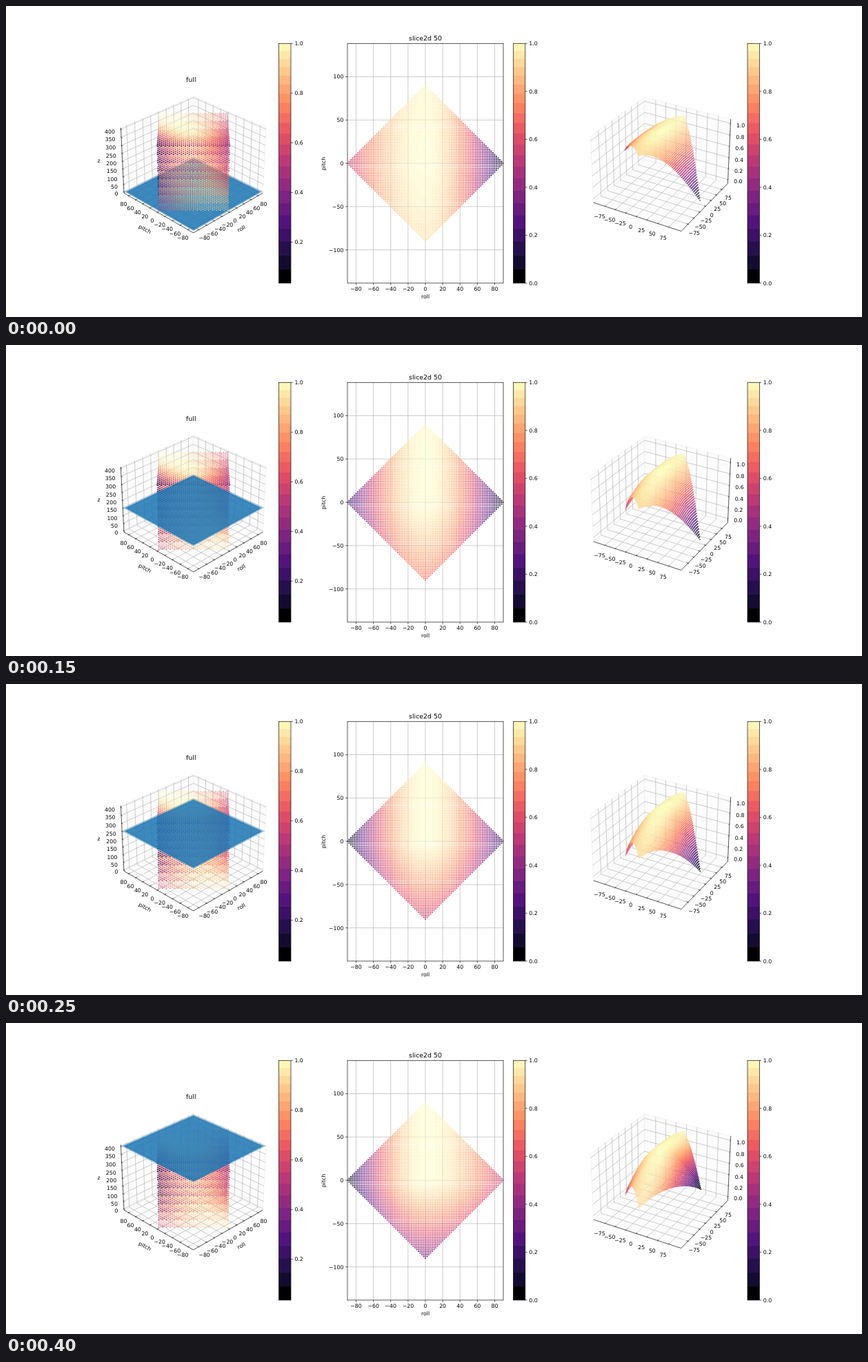
An HTML page with a canvas that plays this animation: 1241x451 px, repeating every 450 ms.

```html
<!DOCTYPE html>
<html lang="en">
<head>
<meta charset="utf-8">
<title>Slices</title>
<style>
html, body { margin: 0; width: 100%; height: 100%; overflow: hidden; background: #fff; }
canvas { display: block; }
</style>
</head>
<body>
<canvas id="stage" width="1241" height="451"></canvas>
<script>
const W = 1241, H = 451, STEP = 50, LAYERS = 9;
const FONT = '"DejaVu Sans", Verdana, sans-serif';
const DOT = 0.98, THIN = 0.65;
const RAD = Math.PI / 180;
const stage = document.getElementById('stage').getContext('2d');

// Colour map
const stops = [[0, 0, 4], [28, 16, 68], [81, 18, 124], [130, 38, 129], [183, 55, 121],
  [231, 82, 99], [252, 137, 97], [254, 196, 136], [252, 253, 191]];
function mapColor(v) {
  const f = Math.min(1, Math.max(0, v)) * 8, i = Math.min(7, Math.floor(f));
  const c = stops[i].map((a, k) => Math.round(a + (stops[i + 1][k] - a) * (f - i)));
  return `rgb(${c})`;
}
const palette = Array.from({ length: 65 }, (_, i) => mapColor(i / 64));
const shade = v => palette[Math.round(v * 64)];

// Value of the field at a roll, a pitch and a height
function field(r, p, z) {
  const left = Math.min(90, 60 + 0.15 * z) / 90;
  const right = Math.min(90, 60 + 0.15 * (400 - z)) / 90;
  const tip = p < 0 ? 22 + 0.19 * z - 0.00017 * z * z : 12 * (1 - z / 400);
  const drop = (1 - Math.cos(tip * RAD)) * (Math.abs(p) / 90) ** 1.3;
  const v = Math.cos(r * (r < 0 ? left : right) * RAD) - drop;
  return Math.min(1, Math.max(0, v));
}

function diamond(step) {
  const pts = [];
  for (let r = -90; r <= 90; r += step)
    for (let p = -90; p <= 90; p += step)
      if (Math.abs(r) + Math.abs(p) <= 90) pts.push([r, p]);
  return pts;
}
const fine = diamond(2), coarse = diamond(5);

// Perspective camera; box coordinates run from -1 to 1
function camera(cx, cy, azim) {
  const ca = Math.cos(azim * RAD), sa = Math.sin(azim * RAD);
  const ce = Math.cos(30 * RAD), se = 0.5, scale = 1223;
  return (x, y, z) => {
    x *= 0.5714; y *= 0.5714; z *= 0.4286;
    const u = x * ca + y * sa, w = u * ce + z * se, d = 10 - w;
    return [cx + scale * (y * ca - x * sa) / d, cy - scale * (z * ce - u * se) / d, w];
  };
}
const fullView = camera(271.7, 225, 225);
const sliceView = camera(950.9, 224.7, -60);
const fullPoint = (r, p, z) => fullView(r / 90, p / 90, z / 200 - 1);
const slicePoint = (r, p, v) => sliceView(r / 99, p / 99, (v + 0.05) / 0.55 - 1);

function layer() {
  const c = document.createElement('canvas');
  c.width = W;
  c.height = H;
  return c.getContext('2d');
}

function line(g, pts, color, width = THIN) {
  g.beginPath();
  pts.forEach(p => g.lineTo(p[0], p[1]));
  g.strokeStyle = color;
  g.lineWidth = width;
  g.stroke();
}

function fill(g, pts, color) {
  g.beginPath();
  pts.forEach(p => g.lineTo(p[0], p[1]));
  g.closePath();
  g.fillStyle = color;
  g.fill();
}

// Centres the capital height on y
function text(g, s, x, y, align = 'center', size = 7.8, turn = 0) {
  g.save();
  g.translate(x, y);
  g.rotate(turn * RAD);
  g.font = `${size}px ${FONT}`;
  g.textAlign = align;
  g.fillStyle = '#000';
  g.fillText(String(s).replace('-', '\u2212'), 0, 0.365 * size);
  g.restore();
}

function dot(g, x, y, color) {
  g.fillStyle = color;
  g.beginPath();
  g.arc(x, y, DOT, 0, 7);
  g.fill();
}

// Far dots first, fading with distance
function scatter(g, pts) {
  pts.sort((a, b) => a.at[2] - b.at[2]);
  const far = pts[0].at[2], near = pts[pts.length - 1].at[2];
  for (const { at, v } of pts) {
    g.globalAlpha = 0.3 + 0.7 * (at[2] - far) / (near - far);
    dot(g, at[0], at[1], shade(v));
  }
  g.globalAlpha = 1;
}

const range = (from, to, by) =>
  Array.from({ length: Math.round((to - from) / by) + 1 }, (_, i) => from + i * by);

// Walls, grid and labelled ticks of a 3D box
function box(g, o) {
  const E = 25 / 24, v = o.view, bx = o.backX;
  const quads = [
    [[-E, -E, -E], [E, -E, -E], [E, E, -E], [-E, E, -E]],
    [[bx * E, -E, -E], [bx * E, E, -E], [bx * E, E, E], [bx * E, -E, E]],
    [[-E, E, -E], [E, E, -E], [E, E, E], [-E, E, E]]
  ];
  for (const q of quads) {
    const pts = q.map(c => v(...c));
    fill(g, pts, '#fcfcfc');
    line(g, [...pts, pts[0]], '#ededed');
  }
  const grid = (...pts) => line(g, pts.map(c => v(...c)), '#b0b0b0');
  const tick = (a, b) => line(g, [v(...a), v(...b)], '#000');
  const inn = E - 0.034, out = E + 0.017;
  const label = (s, c, off, align) => {
    const p = v(...c);
    text(g, s, p[0] + off[0], p[1] + off[1], align);
  };
  for (const t of o.ticks) {
    const n = t / o.half;
    grid([n, -E, -E], [n, E, -E], [n, E, E]);
    grid([-bx * E, n, -E], [bx * E, n, -E], [bx * E, n, E]);
  }
  for (const t of o.zTicks) {
    const n = o.zNorm(t);
    grid([bx * E, -E, n], [bx * E, E, n], [-bx * E, E, n]);
  }
  for (const t of o.ticks) {
    const n = t / o.half;
    tick([n, -inn, -E], [n, -out, -E]);
    tick([-bx * inn, n, -E], [-bx * out, n, -E]);
    label(t, [n, -E, -E], o.xOff);
    label(t, [-bx * E, n, -E], o.yOff);
  }
  for (const t of o.zTicks) {
    const n = o.zNorm(t);
    tick([-bx * E, inn, n], [-bx * E, out, n]);
    label(o.zText(t), [-bx * E, E, n], o.zOff, o.zAlign);
  }
  line(g, [v(-E, -E, -E), v(E, -E, -E)], '#000');
  line(g, [v(-bx * E, -E, -E), v(-bx * E, E, -E)], '#000');
  line(g, [v(-bx * E, E, -E), v(-bx * E, E, E)], '#000');
}

// Bands grow towards the dark end
function colorBar(g, x, low) {
  const top = 54.3, h = 347.6, n = 22;
  let y = top;
  for (let i = 0; i < n; i++) {
    const b = 11 + i * (h - 11 * n) / (n * (n - 1) / 2);
    g.fillStyle = mapColor(i === n - 1 ? 0 : 1 - (y + b / 2 - top) / h);
    g.fillRect(x, y, 17.4, b + (i < n - 1 ? 0.5 : 0));
    y += b;
  }
  g.strokeStyle = '#000';
  g.lineWidth = THIN;
  g.strokeRect(x, top, 17.4, h);
  for (const t of range(0, 1, 0.2)) {
    if (t < low) continue;
    const ty = top + h * (1 - t) / (1 - low);
    line(g, [[x + 17.4, ty], [x + 20.2, ty]], '#000');
    text(g, t.toFixed(1), x + 22.8, ty, 'left');
  }
}

const mapX = r => 608 + r * 1.2556;
const mapY = p => 228.1 - p * 1.2556;

function flatGrid(g) {
  for (const r of range(-80, 80, 20)) {
    const x = mapX(r);
    line(g, [[x, 54.3], [x, 401.9]], '#b0b0b0');
    line(g, [[x, 401.9], [x, 404.6]], '#000');
    text(g, r, x, 410.5);
  }
  for (const p of range(-100, 100, 50)) {
    const y = mapY(p);
    line(g, [[495, y], [721, y]], '#b0b0b0');
    line(g, [[492.3, y], [495, y]], '#000');
    text(g, p, 489.5, y, 'right');
  }
  text(g, 'slice2d 50', 608, 46.5, 'center', 9.4);
  text(g, 'roll', 608, 421.3);
  text(g, 'pitch', 460.5, 228.5, 'center', 7.8, -90);
}

function buildBase() {
  const g = layer();
  g.fillStyle = '#fff';
  g.fillRect(0, 0, W, H);
  box(g, {
    view: fullView, backX: 1, half: 90, ticks: range(-80, 80, 20),
    zTicks: range(0, 400, 50), zNorm: t => t / 200 - 1, zText: t => t,
    xOff: [8, 12], yOff: [-7.5, 12], zOff: [-8.5, 3.2], zAlign: 'right'
  });
  text(g, 'full', 268.3, 106.5, 'center', 9.4);
  text(g, 'z', 134.5, 224.3);
  text(g, 'pitch', 201.5, 323.5, 'center', 7.8, 28);
  text(g, 'roll', 341, 322.7, 'center', 7.8, -28);
  box(g, {
    view: sliceView, backX: -1, half: 99, ticks: range(-75, 75, 25),
    zTicks: range(0, 1, 0.2), zNorm: t => (t + 0.05) / 0.55 - 1, zText: t => t.toFixed(1),
    xOff: [-8, 15], yOff: [9, 12.5], zOff: [8.5, 3], zAlign: 'left'
  });
  flatGrid(g);
  colorBar(g, 395.6, 0.035);
  colorBar(g, 735.4, 0);
  colorBar(g, 1075, 0);
  return g.canvas;
}

function buildCloud() {
  const g = layer(), pts = [];
  for (let i = 0; i < LAYERS; i++)
    for (const [r, p] of coarse)
      pts.push({ at: fullPoint(r, p, i * 50), v: field(r, p, i * 50) });
  scatter(g, pts);
  return g.canvas;
}

function drawPlane(g, z) {
  const pts = [[-90, -90], [90, -90], [90, 90], [-90, 90]].map(([r, p]) => fullPoint(r, p, z));
  line(g, [...pts, pts[0], pts[1]], 'rgba(31,119,180,0.45)', 3);
  fill(g, pts, 'rgba(31,119,180,0.86)');
}

const base = buildBase(), cloud = buildCloud(), scenes = [];

function scene(i) {
  if (scenes[i]) return scenes[i];
  const g = layer(), z = i * 50;
  g.drawImage(base, 0, 0);
  // The low planes lie behind the cloud
  if (z < 100) drawPlane(g, z);
  g.drawImage(cloud, 0, 0);
  if (z >= 100) drawPlane(g, z);

  g.save();
  g.beginPath();
  g.rect(495, 54, 226, 348);
  g.clip();
  for (const [r, p] of fine) dot(g, mapX(r), mapY(p), shade(field(r, p, z)));
  g.restore();
  g.strokeStyle = '#000';
  g.lineWidth = THIN;
  g.strokeRect(495, 54.3, 226, 347.6);

  // The surface moves but keeps the colours of the lowest slice
  scatter(g, fine.map(([r, p]) => ({
    at: slicePoint(r, p, field(r, p, z)), v: field(r, p, 0)
  })));
  return scenes[i] = g.canvas;
}

const start = performance.now();
function render(now) {
  const t = Math.max(0, now - start) % (STEP * LAYERS);
  stage.drawImage(scene(Math.floor(t / STEP)), 0, 0);
  requestAnimationFrame(render);
}
for (let i = 0; i < LAYERS; i++) scene(i);
render(start);
</script>
</body>
</html>
```
